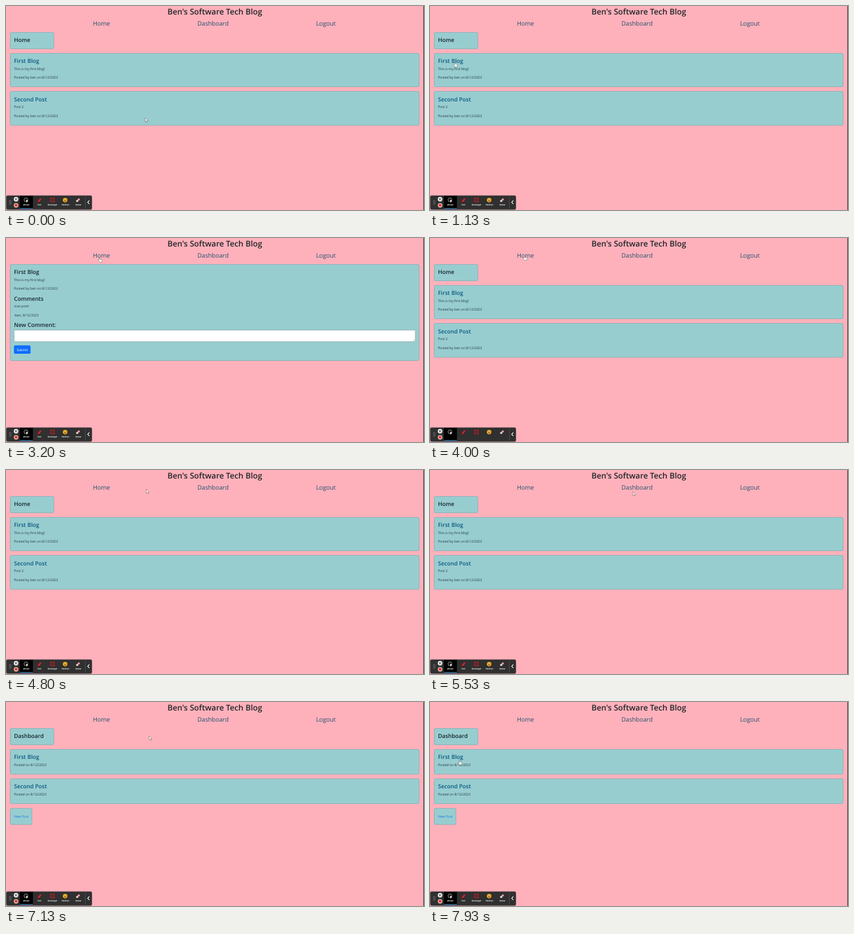
An HTML page for the animation above (8 s loop, 640x312 px).

```html
<!DOCTYPE html>
<html lang="en">
<head>
<meta charset="utf-8">
<title>Blog walkthrough</title>
<style>
  html, body { margin: 0; width: 100%; height: 100%; overflow: hidden; background: #ffb1bb; }
  svg { display: block; width: 640px; height: 312px; font-family: "Open Sans", "Noto Sans", sans-serif; text-rendering: geometricPrecision; }

  .title { font-size: 12.15px; font-weight: 600; fill: #212529; text-anchor: middle; }
  .nav { font-size: 9.3px; fill: #24536f; }
  .head { font-size: 8.65px; font-weight: 600; fill: #16262c; }
  .link { fill: #0b5a80; }
  .body { font-size: 5.15px; fill: #24383d; }
  .card { fill: #98cdd0; stroke: #7fb0b4; stroke-width: .8; }
  .labels { font-size: 2.95px; font-weight: 700; fill: #fff; text-anchor: middle; }

  .home, .post, .dash, .labels, .arrow, .hand { animation: 8s step-end infinite; }
  .home { animation-name: home; }
  .post { animation-name: post; }
  .dash { animation-name: dash; }
  .labels { animation-name: labels; }
  .arrow { animation-name: arrow; }
  .hand { animation-name: hand; }
  .pointer { animation: move 8s ease-in-out infinite; }

  @keyframes home {
    0%, 48.375% { visibility: visible; }
    16.25%, 77%, 100% { visibility: hidden; }
  }
  @keyframes post {
    0%, 48.375%, 100% { visibility: hidden; }
    16.25% { visibility: visible; }
  }
  @keyframes dash {
    0% { visibility: hidden; }
    77%, 100% { visibility: visible; }
  }
  @keyframes labels {
    0%, 50.8%, 100% { visibility: visible; }
    48.375% { visibility: hidden; }
  }
  @keyframes arrow {
    0%, 16.25%, 57%, 87% { visibility: visible; }
    9%, 36.5%, 72%, 94%, 100% { visibility: hidden; }
  }
  @keyframes hand {
    0%, 16.25%, 57%, 87% { visibility: hidden; }
    9%, 36.5%, 72%, 94%, 100% { visibility: visible; }
  }
  @keyframes move {
    0%, 1.5% { transform: translate(213px, 171px); }
    10.5%, 27% { transform: translate(38px, 86px); }
    38%, 41% { transform: translate(143px, 30px); }
    46%, 55% { transform: translate(144.5px, 27px); }
    66%, 70% { transform: translate(310.5px, 33px); }
    74%, 85% { transform: translate(314.5px, 31.5px); }
    95%, 100% { transform: translate(45px, 89px); }
  }
</style>
</head>
<body>
<svg viewBox="0 0 640 312">
  <rect width="640" height="312" fill="#ffb1bb"/>
  <text class="title" x="319.7" y="13.2">Ben's Software Tech Blog</text>
  <g class="nav">
    <text x="133" y="30">Home</text>
    <text x="293" y="30">Dashboard</text>
    <text x="474.7" y="30">Logout</text>
  </g>

  <g class="home">
    <rect class="card" x="6.5" y="40.5" width="66.7" height="25" rx="1.8"/>
    <rect class="card" x="6.5" y="72.5" width="626" height="51" rx="1.8"/>
    <rect class="card" x="6.5" y="130.5" width="626" height="51.8" rx="1.8"/>
    <text class="head" x="12.2" y="55.2">Home</text>
    <text class="head link" x="12.2" y="87.3">First Blog</text>
    <text class="body" x="12.2" y="97.8">This is my first blog!</text>
    <text class="body" x="12.2" y="111">Posted by ben on 8/12/2023</text>
    <text class="head link" x="12.2" y="145.6">Second Post</text>
    <text class="body" x="12.2" y="156.2">Post 2</text>
    <text class="body" x="12.2" y="169.5">Posted by ben on 8/12/2023</text>
  </g>

  <g class="post">
    <rect class="card" x="6.5" y="40.5" width="626" height="147" rx="1.8"/>
    <text class="head" x="12.2" y="55.2">First Blog</text>
    <text class="body" x="12.2" y="66">This is my first blog!</text>
    <text class="body" x="12.2" y="79.3">Posted by ben on 8/12/2023</text>
    <text class="head" x="12.2" y="95.8">Comments</text>
    <text class="body" x="12.2" y="106.2">nice post!</text>
    <text class="body" x="12.2" y="119.6">-ben, 8/12/2023</text>
    <text class="head" x="12.2" y="136">New Comment:</text>
    <rect x="12.4" y="140.9" width="614.4" height="17.7" rx="1.6" fill="#fff" stroke="#8aa5a8" stroke-width=".7"/>
    <path d="M623.3 157.4l2.4-2.4M624.7 157.4l1-1" stroke="#888" stroke-width=".5"/>
    <rect x="12.2" y="164.2" width="25.4" height="12.8" rx="1.8" fill="#0d6efd"/>
    <text class="body" x="24.9" y="172.5" text-anchor="middle" style="fill:#fff">Submit</text>
  </g>

  <g class="dash">
    <rect class="card" x="6.5" y="40.5" width="66.7" height="25" rx="1.8"/>
    <rect class="card" x="6.5" y="72.5" width="626" height="37.8" rx="1.8"/>
    <rect class="card" x="6.5" y="117.5" width="626" height="38" rx="1.8"/>
    <rect class="card" x="6.5" y="162.7" width="33.2" height="24.6" rx="1.8"/>
    <text class="head" x="12.2" y="55.2">Dashboard</text>
    <text class="head link" x="12.2" y="87.3">First Blog</text>
    <text class="body" x="12.2" y="97.8">Posted on 8/12/2023</text>
    <text class="head link" x="12.2" y="132.3">Second Post</text>
    <text class="body" x="12.2" y="142.8">Posted on 8/12/2023</text>
    <text class="body" x="12.2" y="177" style="fill:#1677e8">New Post</text>
  </g>

  <rect x="639" width="1" height="312" fill="#4a3a40"/>

  <g class="toolbar">
    <rect x=".5" y="290" width="131" height="21.3" rx="2" fill="#303030" stroke="#55494c" stroke-width=".6"/>
    <path d="M5 298h3M5 300.5h3M5 303h3" stroke="#aaa" stroke-width="1" stroke-dasharray="1 1"/>
    <circle cx="15.4" cy="295.6" r="3.5" fill="#f2f2f2"/>
    <path d="M14.5 294v3.2M16.3 294v3.2" stroke="#333" stroke-width=".9"/>
    <circle cx="15.4" cy="304.8" r="3.4" fill="#f3d4d0"/>
    <circle cx="15.4" cy="304.8" r="2.3" fill="#e0392f"/>
    <rect x="21.2" y="290.5" width="20" height="19.8" fill="#000"/>
    <rect x="21.2" y="309.2" width="20" height="1.1" fill="#3b8fd0"/>
    <circle cx="30.6" cy="296.4" r="2.9" fill="none" stroke="#ddd" stroke-width=".7"/>
    <path d="M30.4 295.6l3.8 3.4-1.7.1-.9 1.6z" fill="#fff"/>
    <path d="M49.6 299l3.8-4.2" stroke="#e3202b" stroke-width="2.2"/>
    <path d="M48.4 300.2l.6-2 1.5 1.3z" fill="#e3202b"/>
    <rect x="68.6" y="294.2" width="5" height="5" fill="none" stroke="#d8202a"/>
    <path d="M67.6 293.2h1.8v1.8h-1.8zM72.8 293.2h1.8v1.8h-1.8zM67.6 298.4h1.8v1.8h-1.8zM72.8 298.4h1.8v1.8h-1.8z" fill="#b01a22"/>
    <circle cx="90.5" cy="296.8" r="3.4" fill="#fbbd2c"/>
    <path d="M88.3 297.4q2.2 3.4 4.4 0z" fill="#7a3b10"/>
    <path d="M89.2 295.2v1M91.8 295.2v1" stroke="#5a3510" stroke-width=".8"/>
    <path d="M108.4 298.8l4.2-4" stroke="#e79aa4" stroke-width="2.6"/>
    <path d="M108 299.2l1.5-1.5" stroke="#f3e9ea" stroke-width="2.6"/>
    <g class="labels">
      <text x="31.2" y="305.1">Mouse</text>
      <text x="51.2" y="305.1">Pen</text>
      <text x="71.1" y="305.1">Rectangle</text>
      <text x="91" y="305.1">Stickers</text>
      <text x="111" y="305.1">Eraser</text>
    </g>
    <path d="M121.5 291v19.4" stroke="#565656" stroke-width=".7"/>
    <path d="M127.6 297.4l-2.5 2.8 2.5 2.8" fill="none" stroke="#fff" stroke-width="1.1"/>
  </g>

  <g class="pointer" fill="#fff" stroke="#555" stroke-width=".5" stroke-linejoin="round">
    <path class="arrow" d="M0 0v6l1.4-1.2 1 2.2 1.1-.5-1-2.1h1.8z"/>
    <path class="hand" d="M-.7.5q.7-1 1.4 0v2.2l2.6.5q.9.3.8 1.3l-.5 2.5h-3.4l-2-2.7q.2-.9 1.1-.3z"/>
  </g>
</svg>
</body>
</html>
```
